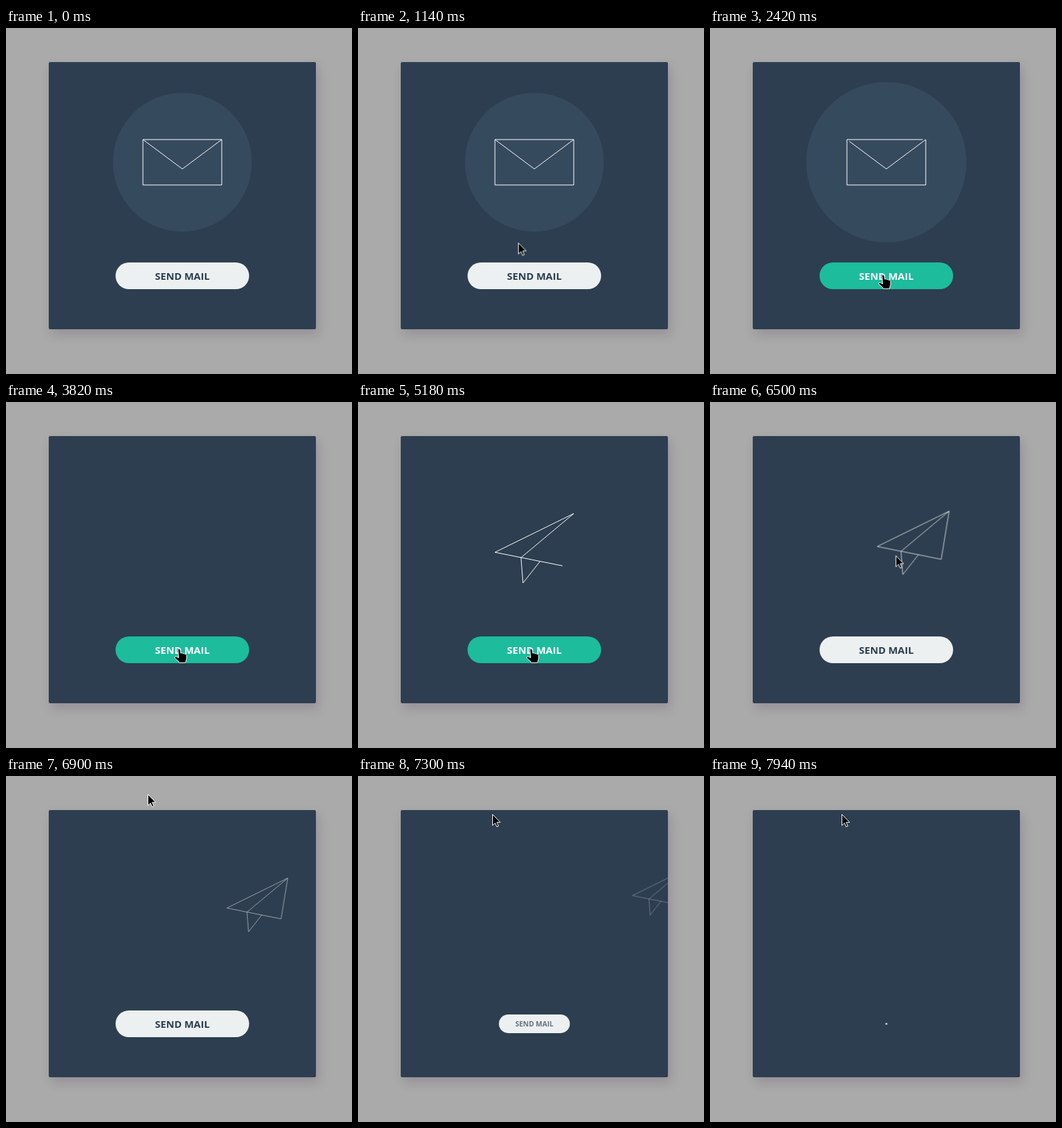
Animation of 518x518 px, one loop 8000 ms. Source, as an HTML page:

```html
<!DOCTYPE html>
<html lang="en">
<head>
<meta charset="utf-8">
<title>Send mail</title>
<style>
  html, body { margin: 0; width: 100%; height: 100%; overflow: hidden; background: #aaa; }

  /* Every animated part shares one 8 s clock: 1% = 80 ms. */
  .anim { animation: 8s linear infinite; }

  .card {
    position: absolute; left: 64px; top: 51px; width: 400px; height: 400px;
    border-radius: 2px; background: #2d3e50;
    box-shadow: 4px 8px 16px rgba(70, 45, 75, .2);
    overflow: hidden;
  }
  svg { position: absolute; left: 0; top: 0; overflow: visible; }
  .lines { fill: none; stroke: #fff; stroke-width: 1; stroke-linejoin: round; }

  .disc { fill: #364a5e; animation-name: disc; }
  @keyframes disc {
    0%, 15.25% { transform: scale(.8667); }
    18.25%, 30.25% { transform: scale(1); animation-timing-function: ease-in-out; }
    40.25%, 100% { transform: scale(0); }
  }

  .envelope { stroke-dasharray: 448; animation-name: erase; }
  @keyframes erase {
    0%, 30.06% { stroke-dashoffset: 0; }
    50.06%, 100% { stroke-dashoffset: -448; }
  }

  .plane { animation-name: fly; }
  .plane path { stroke-dasharray: 320; animation-name: draw; }
  @keyframes draw {
    0%, 50.1% { stroke-dashoffset: 320; }
    70.1%, 100% { stroke-dashoffset: 0; }
  }
  @keyframes fly {
    0%, 70% { transform: translate(0, 0) scale(1); opacity: 1; }
    72%, 78.125% { transform: translate(-5px, 3px) scale(1); opacity: 1; }
    100% { transform: translate(310px, -64px) scale(.39); opacity: .17; }
  }

  .button {
    position: absolute; left: 200px; top: 300px; width: 200px; height: 40px;
    display: grid; place-items: center; overflow: hidden;
    border-radius: 20px; transform: translateX(-50%);
    font: 700 15px/40px "Open Sans", sans-serif; white-space: nowrap;
    animation-name: hover, shrink;
  }
  @keyframes hover {
    0%, 15% { background: #ecf0f1; color: #2c3e50; }
    16%, 72.25% { background: #1dbc9c; color: #fff; }
    73.75%, 100% { background: #ecf0f1; color: #2c3e50; }
  }
  @keyframes shrink {
    0%, 87.5% { width: 200px; transform: translateX(-50%) scale(1); }
    100% { width: 40px; transform: translateX(-50%) scale(0); }
  }
  .label { animation-name: fade; }
  @keyframes fade {
    0%, 87.5% { opacity: 1; }
    100% { opacity: 0; }
  }

  .cursor { stroke: #fff; stroke-linejoin: round; animation-name: point; }
  @keyframes point {
    0%, 6.25% { transform: translate(222px, 7px); }
    10% { transform: translate(232px, 150px); }
    15% { transform: translate(241px, 351px); }
    16.25% { transform: translate(243px, 355px); }
    18.25%, 70% { transform: translate(258px, 369px); }
    72.25% { transform: translate(273px, 350px); }
    74.75% { transform: translate(285px, 314px); }
    77.5% { transform: translate(287px, 262px); }
    80%, 81.25% { transform: translate(278px, 231px); }
    82.25% { transform: translate(262px, 124px); }
    86.25% { transform: translate(212px, 27px); }
    90%, 92.5% { transform: translate(201px, 57px); }
    95%, 100% { transform: translate(197px, 57px); }
  }
  .arrow { animation-name: arrow; animation-timing-function: step-end; }
  .hand { animation-name: hand; animation-timing-function: step-end; }
  @keyframes arrow {
    0% { opacity: 0; }
    6.25% { opacity: 1; }
    15% { opacity: 0; }
    72.25%, 100% { opacity: 1; }
  }
  @keyframes hand {
    0% { opacity: 0; }
    15% { opacity: 1; }
    72.25%, 100% { opacity: 0; }
  }
</style>
</head>
<body>
  <div class="card">
    <svg width="400" height="400">
      <g transform="translate(200 150)">
        <circle class="disc anim" r="120"/>
        <g class="lines">
          <path class="envelope anim" d="M59-34H-59V34H59V-34"/>
          <path class="envelope anim" d="M-59-34L0 10L59-34"/>
          <g class="plane anim">
            <path class="anim" d="M59-34L-59 24L46 45L59-34"/>
            <path class="anim" d="M59-34L-20 32L-17 70L9 37"/>
          </g>
        </g>
      </g>
    </svg>
    <div class="button anim"><span class="label anim">SEND MAIL</span></div>
  </div>
  <svg width="518" height="518">
    <g class="cursor anim">
      <path class="arrow anim" d="M.5.5V17L4.3 13.4L6.8 19L9.3 18L6.9 12.3H12Z"/>
      <path class="hand anim" transform="translate(-6 0)"
        d="M5.5 2.5C5.5.3 8.7.2 9 2.4L9.8 7.2C10.8 6.3 12.4 6.6 12.8 7.7C14 7 15.2 7.4 15.6 8.5C17.2 8.1 18.3 9 18.4 10.5L18.5 15L16.6 21.3H7.6L5.6 18.5L.9 14.6C-.2 13 1.8 11.4 3.4 12.4L6.5 14Z"/>
    </g>
  </svg>
</body>
</html>
```
